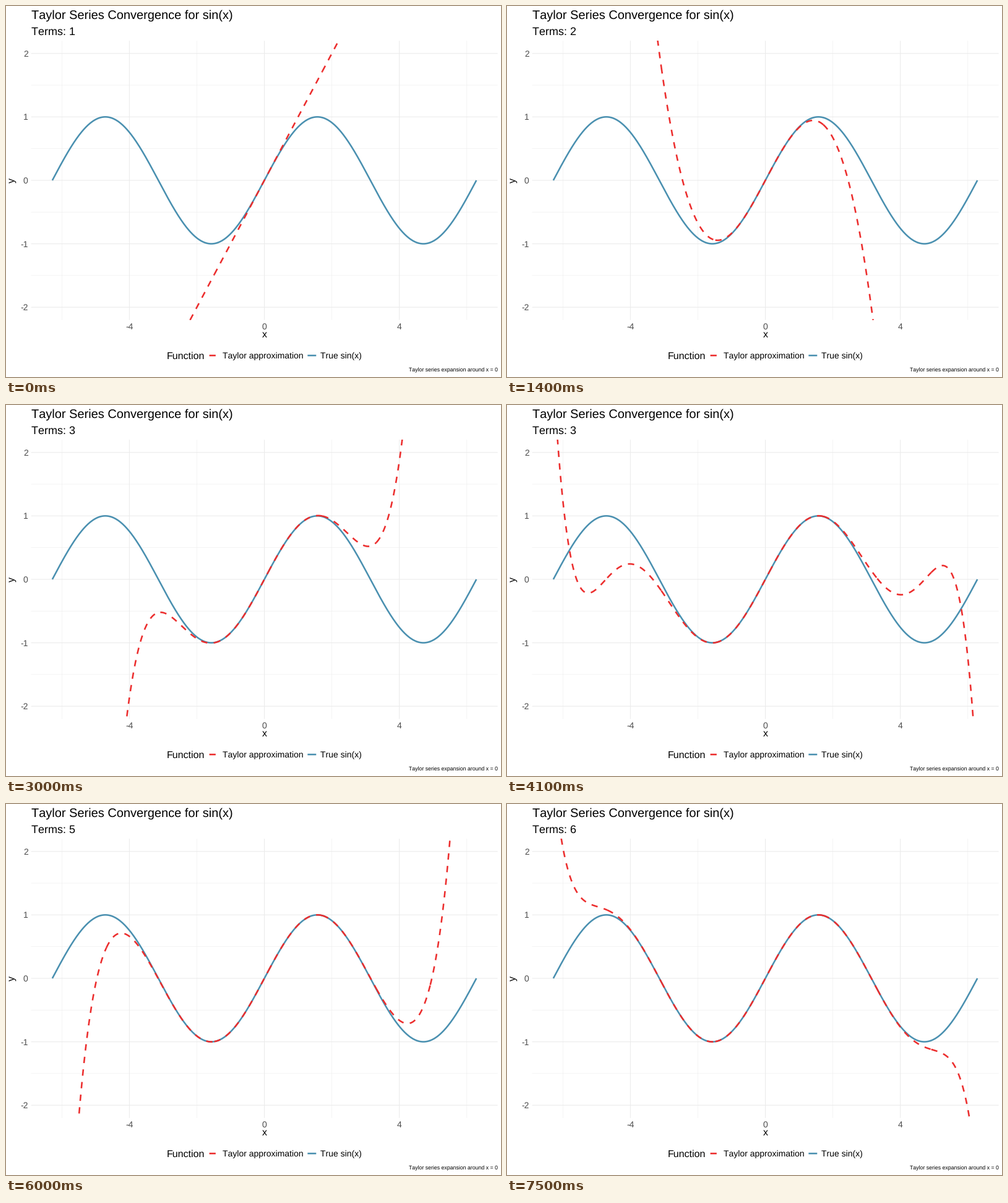
Animation of 800 by 600 pixels, one loop 8000 ms. Source, as a matplotlib script:

```python
import math

import matplotlib.pyplot as plt
import numpy as np
from matplotlib.animation import FuncAnimation
from matplotlib.collections import LineCollection
from matplotlib.patches import Rectangle

plt.rcParams["font.family"] = ["Liberation Sans", "DejaVu Sans"]
plt.rcParams["text.hinting"] = "none"
plt.rcParams["text.kerning_factor"] = 6        # practically no kerning

W, H, DPI = 800, 600, 100
PT = 72 / DPI                                  # points per pixel
LEFT, RIGHT, TOP, BOTTOM = 40.6, 794.5, 56.2, 507.7
CX, CY = (LEFT + RIGHT) / 2, (TOP + BOTTOM) / 2
SX = (RIGHT - LEFT) / (4.4 * math.pi)
SY = (BOTTOM - TOP) / 4.4

RED, BLUE = "#EC2D2D", "#4A90B0"
GRID, GREY = "#EBEBEB", "#4D4D4D"
LINE = 2.56
DASH = 4 * LINE
CHUNK = 1.6                                    # the dash pattern restarts every CHUNK in x

FRAMES, INTERVAL = 80, 100
STARTS = (6, 22, 37, 52, 67)                   # first moving frame of each morph
STEPS = (10, 9, 9, 9, 9)

fig = plt.figure(figsize=(W / DPI, H / DPI), dpi=DPI, facecolor="white")
ax = fig.add_axes([0, 0, 1, 1])
ax.set_xlim(0, W)
ax.set_ylim(H, 0)
ax.axis("off")


def px(x):
    return CX + SX * x


def py(y):
    return CY - SY * y


def stroke(x, y, color, width, z):
    line, = ax.plot(x, y, color=color, lw=width * PT, zorder=z,
                    solid_capstyle="butt", snap=False)
    return line


def label(x, y, s, size, ha="left", color="black", **kw):
    return ax.text(x, y, s, fontsize=size * PT, ha=ha, va="baseline",
                   color=color, **kw)


def taylor(x, weights):
    return sum(w * (-1) ** k * x ** (2 * k + 1) / math.factorial(2 * k + 1)
               for k, w in enumerate(weights))


def ease(p):
    return 4 * p ** 3 if p < 0.5 else 1 - 4 * (1 - p) ** 3


# Grid
for v in (-6, -2, 2, 6):
    stroke([px(v)] * 2, [TOP, BOTTOM], GRID, 0.53, 1)
for v in (-1.5, -0.5, 0.5, 1.5):
    stroke([LEFT, RIGHT], [py(v)] * 2, GRID, 0.53, 1)
for v in (-4, 0, 4):
    stroke([px(v)] * 2, [TOP, BOTTOM], GRID, 1.07, 2)
    label(px(v), 523, str(v), 14, "center", GREY)
for v in range(-2, 3):
    stroke([LEFT, RIGHT], [py(v)] * 2, GRID, 1.07, 2)
    label(35.7, py(v) + 5, str(v), 14, "right", GREY)

# Titles and legend
label(LEFT, 21, "Taylor Series Convergence for sin(x)", 20)
subtitle = label(LEFT, 46.8, "", 18)
label(CX, 536.5, "x", 16, "center")
label(13.8, CY, "y", 16, "center", rotation=90, rotation_mode="anchor")
label(259.7, 571, "Function", 16)
stroke([328.6, 328.6 + DASH], [565.2] * 2, RED, LINE, 3)
label(349.5, 570.2, "Taylor approximation", 14)
stroke([487.4, 501.3], [565.2] * 2, BLUE, LINE, 3)
label(508.5, 570.2, "True sin(x)", 14)
label(RIGHT, 591, "Taylor series expansion around x = 0", 8.8, "right")

# Curves
xs = np.linspace(-2 * math.pi, 2 * math.pi, 1001)
stroke(px(xs), py(np.sin(xs)), BLUE, LINE, 3)
approx = LineCollection([], colors=RED, linewidths=LINE * PT, zorder=4,
                        capstyle="butt")
ax.add_collection(approx, autolim=False)
approx.set_clip_path(Rectangle((LEFT, TOP), RIGHT - LEFT, BOTTOM - TOP,
                               transform=ax.transData))


def dashes(x0, x1, weights):
    """Cut one stretch of the curve into dashes of equal arc length."""
    x = np.linspace(x0, x1, 801)
    y = taylor(x, weights)
    arc = np.concatenate(
        [[0], np.cumsum(np.hypot(SX * np.diff(x), SY * np.diff(y)))])
    begin = np.arange(0, arc[-1], 2 * DASH)
    s = np.minimum(begin[:, None] + np.linspace(0, DASH, 12), arc[-1])
    x = np.interp(s, arc, x)
    pts = np.dstack([px(x), py(taylor(x, weights))])
    y = pts[..., 1]
    return pts[(y.max(axis=1) > TOP - 5) & (y.min(axis=1) < BOTTOM + 5)]


def update(i):
    weights, terms = [1], 1
    for first, steps in zip(STARTS, STEPS):
        k = min(max(i - first + 1, 0), steps)
        weights.append(ease(k / steps))
        terms += k > 5
    end = 2 * math.pi
    approx.set_segments([d for x0 in np.arange(-end, end, CHUNK)
                         for d in dashes(x0, min(x0 + CHUNK, end), weights)])
    subtitle.set_text(f"Terms: {terms}")
    return approx, subtitle


anim = FuncAnimation(fig, update, frames=FRAMES, interval=INTERVAL,
                     repeat=True, repeat_delay=0, blit=False)
plt.show()
```
